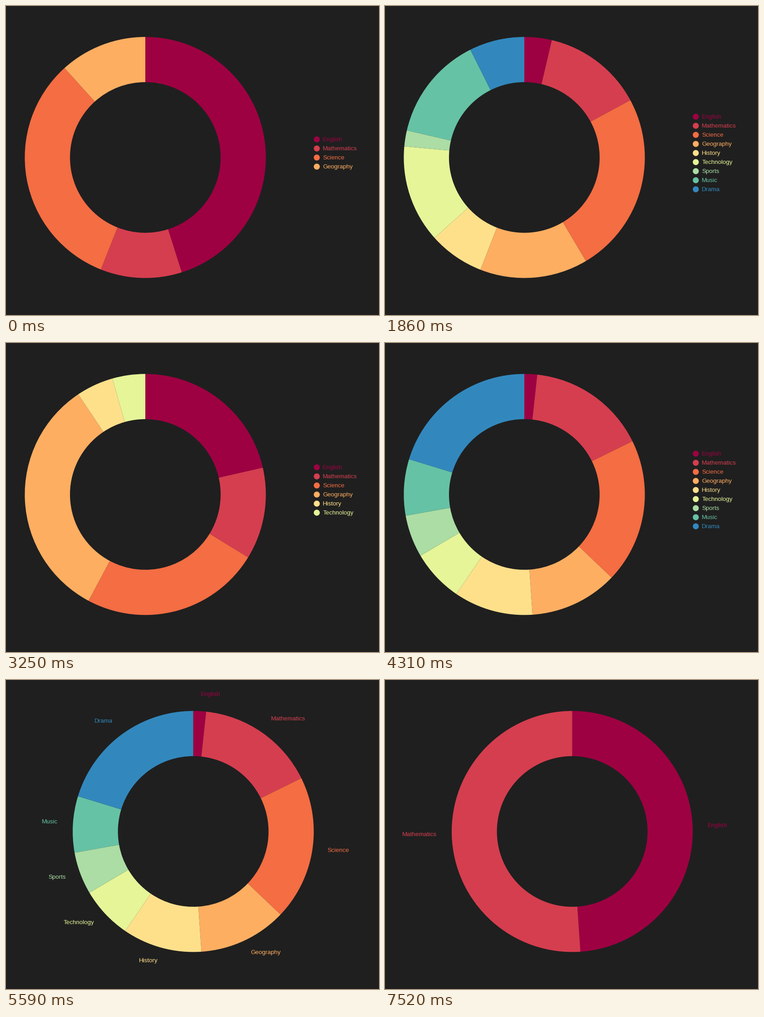
Write a matplotlib script that moves like this. It is 822 by 681 pixels and loops after 8000 ms.

```python
import numpy as np
import matplotlib.pyplot as plt
from matplotlib.animation import FuncAnimation
from matplotlib.patches import Circle, Wedge

W, H, DPI = 822, 681, 100
LOOP, STEP = 8000, 20
BACK = "#1f1f1f"
RADIUS = 332
OUTER, INNER, LABEL = 0.8 * RADIUS, 0.5 * RADIUS, 0.9 * RADIUS
CY = 333.8
LEGEND_X, LEGEND_Y, ROW = 726.3, 324, 20

SUBJECTS = [
    ("English", "#9e0142"), ("Mathematics", "#d53e4f"), ("Science", "#f46d43"),
    ("Geography", "#fdae61"), ("History", "#fee08b"), ("Technology", "#e6f598"),
    ("Sports", "#abdda4"), ("Music", "#66c2a5"), ("Drama", "#3288bd"),
]

FULL = [6.17, 63.78, 133.6, 176.1, 214.35, 239.46, 259.87, 287.0]

# start time in ms, inner slice boundaries in degrees clockwise from the top, legend or labels
SCENES = [
    (0, [162.4, 201.65, 317.9], True),
    (800, [], True),
    (1860, [13.2, 61.63, 149.25, 201.35, 228.15, 275.3, 283.0, 333.4], True),
    (3250, [77.15, 121.45, 208.1, 326.2, 344.13], True),
    (4310, FULL, True),
    (5590, FULL, False),
    (7520, [176.1], False),
]

plt.rcParams["font.family"] = "Liberation Sans"
fig = plt.figure(figsize=(W / DPI, H / DPI), dpi=DPI, facecolor=BACK)
ax = fig.add_axes([0, 0, 1, 1])
ax.set_xlim(0, W)
ax.set_ylim(H, 0)
ax.axis("off")


def write(x, y, text, color, ha="left"):
    return ax.text(x, y, text, color=color, ha=ha, va="baseline",
                   fontsize=13.333 * 72 / DPI)


def ring(cx, edges):
    return [ax.add_patch(Wedge((cx, CY), OUTER, a - 90, b - 90, width=OUTER - INNER,
                               facecolor=color, linewidth=0))
            for a, b, (_, color) in zip(edges, edges[1:], SUBJECTS)]


def legend(count):
    rows = SUBJECTS[:count]
    top = LEGEND_Y - ROW * (count - 1) / 2
    texts = [write(0, top + ROW * i + 4, name, color)
             for i, (name, color) in enumerate(rows)]
    left = LEGEND_X - (20 + max(t.get_window_extent().width for t in texts)) / 2
    for t in texts:
        t.set_x(left + 20)
    dots = [ax.add_patch(Circle((left + 6.6, top + ROW * i), 6.6,
                                facecolor=color, linewidth=0))
            for i, (_, color) in enumerate(rows)]
    return texts + dots


def labels(cx, edges):
    out = []
    for a, b, (name, color) in zip(edges, edges[1:], SUBJECTS):
        mid = np.radians((a + b) / 2)
        out.append(write(cx + LABEL * np.sin(mid), CY - LABEL * np.cos(mid), name, color,
                         "left" if mid < np.pi else "right"))
    return out


def build(cuts, has_legend):
    edges = [0, *cuts, 360]
    cx = 307 if has_legend else 412.6
    extra = legend(len(edges) - 1) if has_legend else labels(cx, edges)
    return ring(cx, edges) + extra


starts = [start for start, _, _ in SCENES]
groups = [build(cuts, has_legend) for _, cuts, has_legend in SCENES]


def update(i):
    # a change inside a step takes effect at its beginning
    now = np.searchsorted(starts, i * STEP + STEP / 2, side="right") - 1
    for k, group in enumerate(groups):
        for artist in group:
            artist.set_visible(k == now)
    return groups[now]


anim = FuncAnimation(fig, update, frames=LOOP // STEP, interval=STEP,
                     repeat=True, repeat_delay=0)
plt.show()
```
